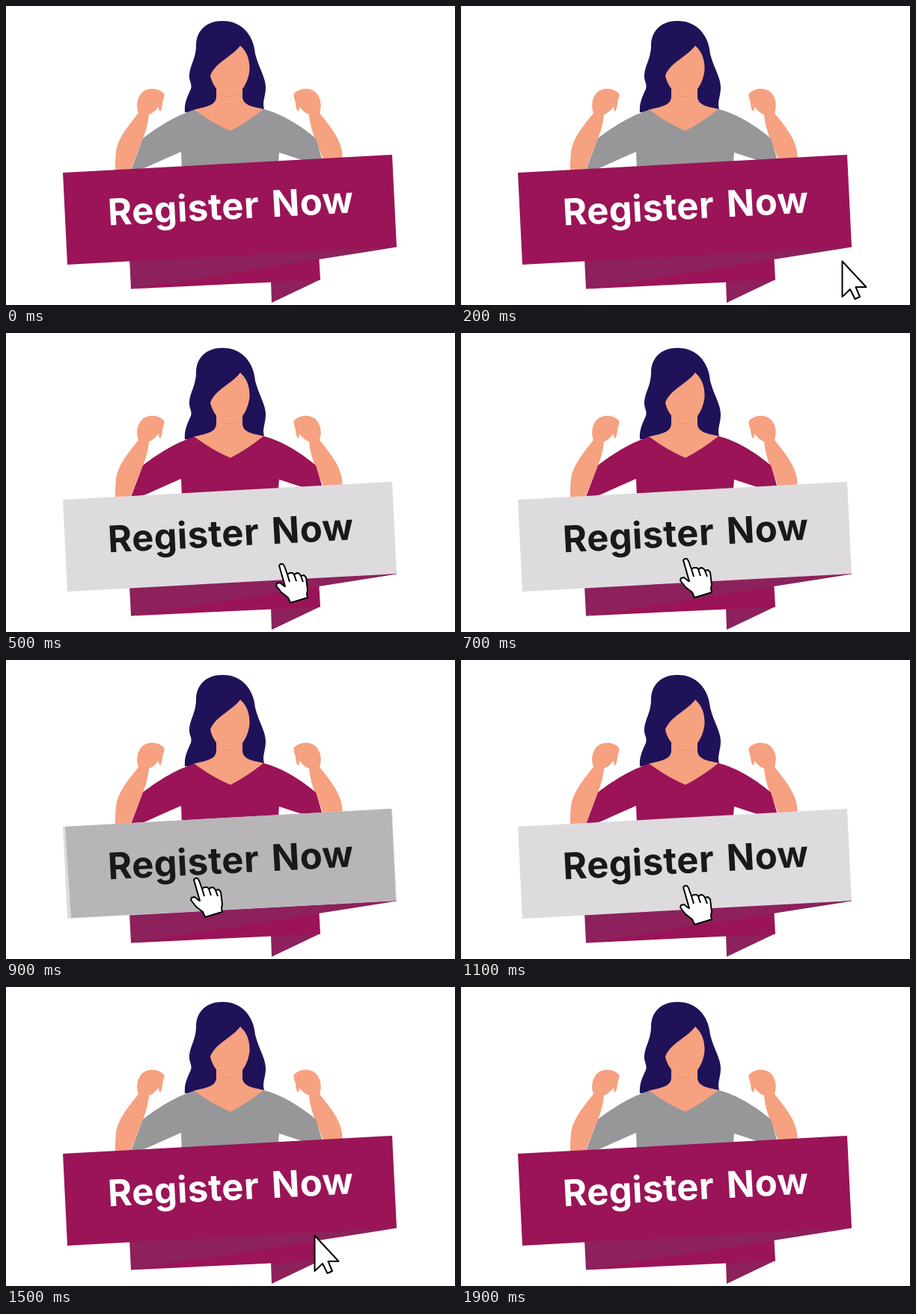
Animation of 600x400 px, one loop 2000 ms. Source, as an HTML page:

```html
<!DOCTYPE html>
<html lang="en">
<head>
<meta charset="utf-8">
<title>Register Now</title>
<style>
  html, body { margin: 0; width: 100%; height: 100%; overflow: hidden; background: #fff; }
  svg { display: block; width: 600px; height: 400px; }

  .skin { fill: #f6a180; }
  .hair { fill: #1f1259; }
  .main { fill: #9a1457; }
  .fold { fill: #8d215b; }
  .label { font: 700 49px Inter, sans-serif; letter-spacing: 0.4px; }

  .shirt, .banner, .label, .press, .arrow, .hand { animation: 2s step-end infinite; }
  .shirt { animation-name: shirt; }
  .banner { animation-name: banner; }
  .label { animation-name: label; }
  .press { animation-name: press; }
  .arrow { animation-name: arrow; }
  .hand { animation-name: hand; }
  .arrow, .hand { fill: #fff; stroke: #000; stroke-width: 2; stroke-linejoin: round; }

  @keyframes shirt {
    0%, 75%, 100% { fill: #979698; }
    25% { fill: #9a1457; }
  }
  @keyframes banner {
    0%, 75%, 100% { fill: #9a1457; }
    25% { fill: #dedbdf; }
  }
  @keyframes label {
    0%, 75%, 100% { fill: #fff; }
    25% { fill: #1a181a; }
  }
  @keyframes press {
    0%, 55%, 100% { visibility: hidden; }
    45% { visibility: visible; }
  }
  @keyframes arrow {
    0%, 95%, 100% { visibility: hidden; transform: translate(557px, 346px); }
    5%, 90% { visibility: visible; transform: translate(557px, 346px); }
    10%, 85% { visibility: visible; transform: translate(509px, 341px); }
    15%, 80% { visibility: visible; transform: translate(460px, 337px); }
    20%, 75% { visibility: visible; transform: translate(412px, 332px); }
    25% { visibility: hidden; transform: translate(412px, 332px); }
  }
  @keyframes hand {
    0%, 75%, 100% { visibility: hidden; transform: translate(364px, 308px); }
    25%, 65% { visibility: visible; transform: translate(364px, 308px); }
    35%, 55% { visibility: visible; transform: translate(296px, 301px); }
    45% { visibility: visible; transform: translate(250px, 291px); }
  }
</style>
</head>
<body>
<svg viewBox="0 0 600 400">
  <!-- woman -->
  <path class="hair" d="M290 20C269 19 253 33 254 55C253 73 245 80 245 95C245 101 249 104 247 111C243 120 238 129 239 142L300 148L345 138C342 129 347 121 347 109C347 95 338 84 333 64C331 38 314 20 290 20Z"/>
  <path class="skin" d="M281 104V121C281 134 265 135 250 139L300 171L346 138C330 135 316 133 316 121V104Z"/>
  <path class="skin" d="M313 53C322 61 326 72 325.500 86C323 106 312 120 300 121C287 120 276 108 273 93C280 75 302 68 313 53Z"/>
  <path d="M289 119Q299 124 310 118" fill="none" stroke="#e8936f"/>
  <g id="arm">
    <path class="skin" d="M177 143C172 130 178 115 188 112C197 109 206 112 211 117C213 121 209 126 209 131Q208 139 206 141Q204 140 204 135C200 139 196 144 191 145C190 158 186 170 183 177L167 218V235H146V209L147 195C150 174 169 154 177 143Z"/>
  </g>
  <use href="#arm" transform="matrix(-1 0 0 1 596 0)"/>
  <path class="shirt" d="M252 139Q276 157 300 167Q323 155 344 138C369 144 395 161 414 177L424 210L408 210Q386 203 365 196L363 220H235L234 195Q211 205 187 216L166 222L183 177C205 160 232 144 252 139Z"/>

  <!-- ribbon -->
  <path class="fold" d="M354 368L420 364V366L355 397Z"/>
  <path class="main" d="M167 378.500L418 330L420 366.500Z"/>
  <path class="fold" d="M165 338L522 320V322.500L167 378.500Z"/>
  <path class="banner" d="M76 223L516 199L522 322L82 346Z"/>
  <path class="press" fill="#b7b5b7" d="M79 223L515 199L521 322L87 345Z"/>
  <text class="label" transform="translate(139 293.500) rotate(-3)"><tspan x="-2">Register</tspan><tspan x="217">Now</tspan></text>

  <!-- pointers -->
  <path class="arrow" d="M0.500 0.500V48L11 38L17.500 51L24 48L18.500 35H32.500Z"/>
  <g class="hand">
    <path d="M1 3L3 1H6L8 4L12 15L15 13H19L21 15L25 13L28 14L30 17L34 16L37 19L39 36L38 41L39 46L16 53L13 46L4 39L-3 30L-2 27L2 26L7 30L9 31Z"/>
    <path d="M12 15L15 25M21 15L24 24M30 17L33 25" fill="none"/>
  </g>
</svg>
</body>
</html>
```
